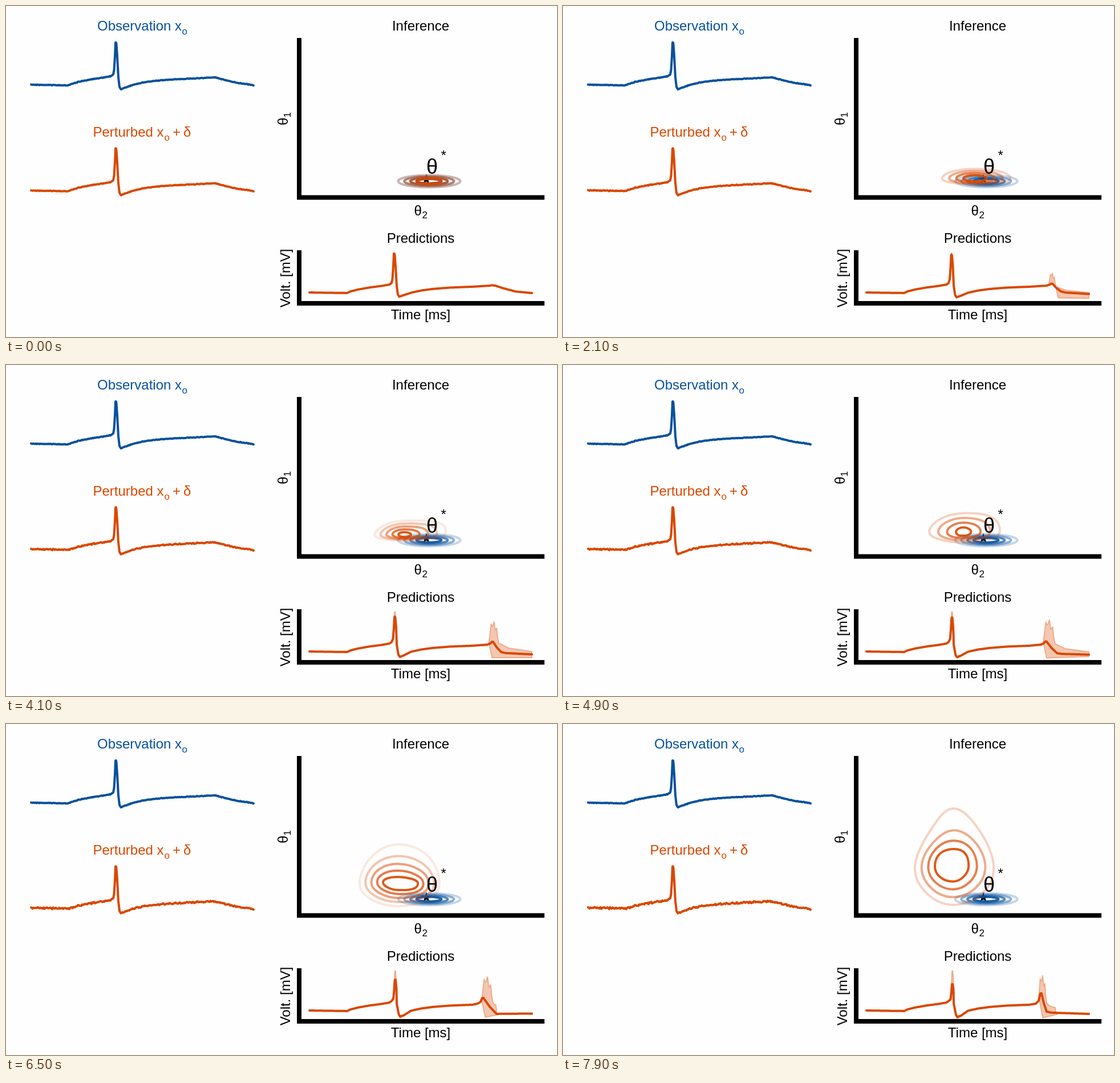
An HTML page for the animation above (8 s loop, 966 px wide and 580 px high).

```html
<!DOCTYPE html>
<html lang="en">
<head>
<meta charset="utf-8">
<title>Inference under perturbation</title>
<style>
  html, body { margin: 0; width: 100%; height: 100%; overflow: hidden; background: #fefefe; }
  svg { display: block; width: 966px; height: 580px; }
  text { font: 24px "Liberation Sans", Arial, sans-serif; }
  .sub { font-size: 17px; }
  .mid { text-anchor: middle; }
  .line { fill: none; stroke-width: 4; stroke-linecap: round; stroke-linejoin: round; }
  .axis { fill: none; stroke: #000; stroke-width: 8; }
  .blue { stroke: #08519c; }
  .orange { stroke: #d94801; }
</style>
</head>
<body>
<svg viewBox="0 0 966 580">
  <g fill="#08519c"><text x="160" y="43">Observation x</text><text class="sub" x="308.5" y="50">o</text></g>
  <path id="observed" class="line blue"/>
  <g fill="#d94801">
    <text x="152.5" y="229">Perturbed x</text><text class="sub" x="277.5" y="236">o</text>
    <text x="292" y="229">+</text><text x="311" y="229">δ</text>
  </g>
  <path id="perturbed" class="line orange"/>

  <text class="mid" x="727" y="43">Inference</text>
  <g transform="translate(494 209) rotate(-90)"><text>θ</text><text class="sub" x="13.5" y="5">1</text></g>
  <text x="715.5" y="367">θ</text><text class="sub" x="729.5" y="372">2</text>
  <path id="star"/>
  <g id="prior"></g>
  <g id="posterior"></g>
  <path class="axis" d="M514 56V335.5H944"/>
  <text x="737" y="294" style="font-size:36px">θ</text>
  <text x="762.5" y="270" style="font-size:24px">*</text>

  <text class="mid" x="727" y="415">Predictions</text>
  <text class="mid" x="727" y="549">Time [ms]</text>
  <text class="mid" transform="translate(497.5 477) rotate(-90)">Volt. [mV]</text>
  <path class="axis" d="M514 428V521H944"/>
  <path id="band" fill="#d94801" fill-opacity=".3" stroke="#d94801" stroke-opacity=".32" stroke-width="2" stroke-linejoin="round"/>
  <path id="median" class="line orange"/>
</svg>
<script>
const LOOP = 8000, STEP = 100;
const $ = id => document.getElementById(id);
const lerp = (a, b, f) => a + (b - a) * f;
const mix = (a, b, f) => a.map((v, i) => lerp(v, b[i], f));
const round = v => Math.round(v * 100) / 100;
const toPath = pts => 'M' + pts.map(p => p.map(round).join(' ')).join('L');

// outer / inner: reach right, down, left, up, then bulge toward SE, SW, NW, NE
// bump: median peak x, y; foot x, y; final y; first spike height
// upper: start x, width, top, shoulder y, end x, end y     lower: start x, level, end x, end y
const ROUND = [1, 1, 1, 1];
const KEYS = [
  { t: 0, n: 4, p: 1, c: [741.5, 307], outer: [55, 10.5, 54, 10.5, ...ROUND], inner: [22, 4, 22, 4, ...ROUND],
    bump: [857, 490, 885, 498, 503, 434], upper: [858, 8, 490, 503, 922, 503], lower: [868, 494, 922, 503] },
  { t: 1200, n: 4, p: 1, c: [728, 305], outer: [63, 9, 54, 13, ...ROUND], inner: [17, 4, 17, 5, ...ROUND],
    bump: [858, 488, 876, 498, 503, 435], upper: [855, 8, 487, 496, 922, 502], lower: [870, 511, 922, 511] },
  { t: 2900, n: 4, p: 1, c: [715, 299.5], outer: [64, 12, 59, 20, 1, 1, 1, 1.03], inner: [26, 6, 21, 6, ...ROUND],
    bump: [856, 485, 870, 502, 506, 437], upper: [848, 17, 450, 488, 922, 502], lower: [857, 512, 922, 514] },
  { t: 4100, n: 5, p: 1, c: [698, 297], outer: [72, 11, 52, 24, 1, 1, .95, 1.2], inner: [12, 4.5, 10, 4, ...ROUND],
    bump: [853, 485, 868, 503, 507, 441], upper: [846, 18, 449, 487, 922, 502], lower: [847, 513, 922, 513] },
  { t: 5600, n: 4, p: 1, c: [704, 287], outer: [58, 26, 65, 39, 1, 1.02, .97, 1.02], inner: [16, 10, 14, 10, 1.1, 1.15, .9, .95],
    bump: [841, 484, 865, 507, 508, 444], upper: [837, 25, 443, 490, 922, 503], lower: [839, 514, 922, 509] },
  { t: 6500, n: 5, p: .74, c: [688, 278], outer: [72, 41, 68, 67, 1, 1, .97, 1], inner: [34, 13, 27, 10, 1.12, .95, 1.05, .95],
    bump: [836, 480, 860, 508, 507.5, 448], upper: [833, 21, 442, 489, 859, 492], lower: [835, 514, 865, 509] },
  { t: 7900, n: 4, p: .56, c: [684, 250], outer: [71, 67, 67, 102, 1, .98, .86, .9], inner: [27, 26, 32, 31, .96, 1, 1.03, 1.08],
    bump: [838, 472, 848, 504, 508, 456], upper: [833, 15, 440, 488, 863, 497], lower: [836, 515, 866, 509] }
];

function poseAt(t) {
  let i = KEYS.length - 2;
  while (i > 0 && KEYS[i].t > t) i--;
  const a = KEYS[i], b = KEYS[i + 1], f = (t - a.t) / (b.t - a.t);
  const pose = { n: f < .5 ? a.n : b.n, p: lerp(a.p, b.p, f) };
  for (const k of ['c', 'outer', 'inner', 'bump', 'upper', 'lower']) pose[k] = mix(a[k], b[k], f);
  return pose;
}

// Voltage trace
const TRACE = [[44, 138], [80, 138.6], [110, 139], [116, 136], [130, 132.2], [150, 128.4], [170, 125.6],
  [184, 123], [188, 120], [189.5, 112], [191, 88], [192, 64], [193.3, 64], [195, 88], [197, 125], [199, 142],
  [201.5, 146], [208, 143.5], [222, 138.5], [240, 134.2], [260, 131.3], [290, 128.7], [330, 127], [367, 125],
  [374, 127], [388, 131], [405, 134.5], [420, 136.5], [434, 139]];

function sampler(knots) {
  return x => {
    let i = 0;
    while (i < knots.length - 2 && knots[i + 1][0] < x) i++;
    const [a, b] = [knots[i], knots[i + 1]];
    return lerp(a[1], b[1], Math.min(1, Math.max(0, (x - a[0]) / (b[0] - a[0]))));
  };
}

function sample(fn, from, to) {
  const pts = [];
  for (let x = from; x <= to; x += .5) pts.push([x, fn(x)]);
  return pts;
}

function noise(seed) {
  const at = i => {
    const s = Math.sin(i * 127.1 + seed * 311.7) * 43758.5453;
    return (s - Math.floor(s)) * 2 - 1;
  };
  return x => {
    const u = x / 1.5, i = Math.floor(u);
    return lerp(at(i), at(i + 1), u - i);
  };
}

const trace = sampler(TRACE), fineNoise = noise(1), roughNoise = noise(2);
const calm = x => x > 186 && x < 203 ? .2 : 1;
const noisyTrace = amp => x => trace(x) + calm(x) * (.5 * fineNoise(x) + amp * roughNoise(x));

// Contours
function ringPath([cx, cy], s) {
  const pts = Array.from({ length: 8 }, (_, k) => {
    const co = Math.cos(k * Math.PI / 4), si = Math.sin(k * Math.PI / 4);
    const f = k % 2 ? s[4 + (k - 1) / 2] : 1;
    return [cx + f * co * (co > 0 ? s[0] : s[2]), cy + f * si * (si > 0 ? s[1] : s[3])];
  });
  const at = i => pts[(i + 8) % 8];
  const handle = (i, sign) => at(i).map((v, j) => v + sign * (at(i + 1)[j] - at(i - 1)[j]) / 5.33);
  let d = 'M' + pts[0].map(round);
  for (let i = 0; i < 8; i++)
    d += 'C' + [handle(i, 1), handle(i + 1, -1), at(i + 1)].map(p => p.map(round).join(' ')).join(' ');
  return d + 'Z';
}

function makeRings(group, color) {
  return Array.from({ length: 5 }, () => {
    const path = document.createElementNS('http://www.w3.org/2000/svg', 'path');
    path.setAttribute('class', 'line ' + color);
    return group.appendChild(path);
  });
}

function drawRings(rings, { n, p, c, outer, inner }) {
  rings.forEach((ring, i) => {
    if (i >= n) return ring.setAttribute('d', '');
    const u = i / (n - 1);
    const shape = mix(outer, inner, u);
    shape[3] = lerp(outer[3], inner[3], u ** p);
    ring.setAttribute('d', ringPath(c, shape));
    ring.setAttribute('stroke-opacity', lerp(n === 5 ? .12 : .23, .9, u));
  });
}

// Predictions
const JAGS = [[0, 0], [.12, .4], [.24, .9], [.34, .78], [.42, .82], [.54, 1], [.64, .6], [.8, .7], [.88, .3], [1, 0]];

function drawPrediction({ bump, upper, lower }, progress) {
  const [px, py, fx, fy, endY, peak] = bump;
  const shrink = (490 - peak) / 56, shift = 2 * progress;
  const head = scale => TRACE.map(([x, y]) => {
    let v = 502 + (y - 138) * .92;
    if (y < 118) v = 490 - (490 - v) * scale;
    if (y > 140) v += 4 * progress;
    return [x + 488 + (y < 118 || y > 140 ? shift : 0), v];
  }).filter(([x]) => x < px - 10);
  const tail = [[px - 9, 490], [px - 4, lerp(489, py, .25)], [px - 1, py], [px + 1, py],
    [lerp(px, fx, .5), lerp(py, fy, .55)], [fx, fy], [fx + 8, lerp(fy, endY, .45)], [922, endY]];
  const median = sampler([...head(shrink), ...tail]);
  const tall = sampler([...head(1.03), ...tail]);

  const [ux, uw, top, shoulder, uxEnd, uyEnd] = upper;
  const spikes = sampler([...JAGS.map(([f, h]) => [ux + f * uw, lerp(lerp(489, shoulder, f), top, h)]),
    [ux + uw + .3 * (uxEnd - ux - uw), lerp(shoulder, uyEnd, .6)], [uxEnd, uyEnd], [uxEnd + 3, 520]]);
  const [lx, level, lxEnd, lyEnd] = lower;
  const floor = sampler([[lx, 489], [lx + 5, level], [lxEnd, lyEnd]]);
  const highEdge = x => x < 720 ? Math.min(tall(x), median(x)) : x < ux ? median(x) : Math.min(median(x), spikes(x));
  const lowEdge = x => {
    const m = median(x);
    if (x < 720) return m + 3.5 * progress * Math.exp(-(((x - 690) / 6) ** 2));
    return x < lx || x > lxEnd ? m : Math.max(m, floor(x));
  };
  const edge = [...sample(highEdge, 532, 922), ...sample(lowEdge, 532, 922).reverse()];
  $('band').setAttribute('d', toPath(edge) + 'Z');
  $('median').setAttribute('d', toPath(sample(median, 532, 922)));
}

const starPoints = Array.from({ length: 10 }, (_, k) => {
  const r = k % 2 ? 3.6 : 9.5, a = k * Math.PI / 5;
  return [737 + r * Math.sin(a), 304 - r * Math.cos(a)];
});
$('star').setAttribute('d', toPath(starPoints) + 'Z');
$('observed').setAttribute('d', toPath(sample(noisyTrace(0), 44, 434)));
drawRings(makeRings($('prior'), 'blue'), KEYS[0]);
const posterior = makeRings($('posterior'), 'orange');

function draw(t) {
  const pose = poseAt(t), progress = t / LOOP;
  const wave = noisyTrace(.1 + 1.2 * progress);
  const shifted = x => wave(x) + 185.5 - (x < 110 ? 1.5 * progress : 0);
  $('perturbed').setAttribute('d', toPath(sample(shifted, 44, 434)));
  drawRings(posterior, pose);
  drawPrediction(pose, progress);
}

const start = performance.now();
let shown = -1;
function tick() {
  const t = Math.floor((performance.now() - start) % LOOP / STEP) * STEP;
  if (t !== shown) draw(shown = t);
  requestAnimationFrame(tick);
}
tick();
</script>
</body>
</html>
```
